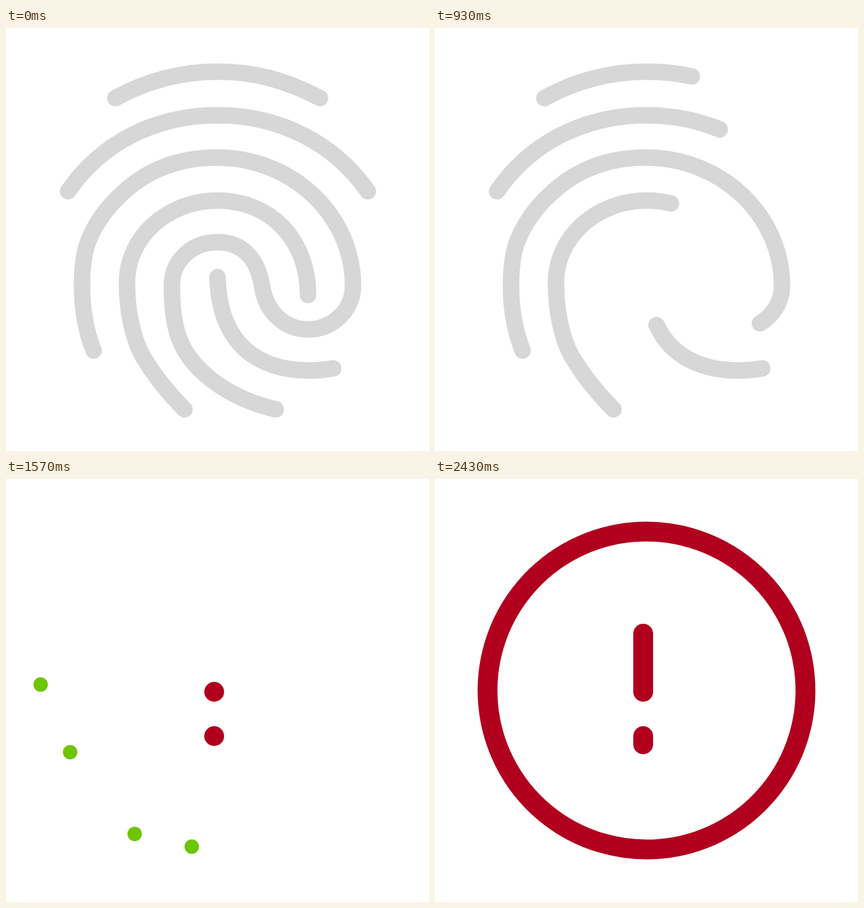
Animation of 640x640 px, one loop 4780 ms. Source, as an HTML page with a canvas:

```html
<!DOCTYPE html>
<html lang="en">
<head>
<meta charset="utf-8">
<title>Fingerprint rejected</title>
<style>
html, body { margin: 0; width: 100%; height: 100%; overflow: hidden; background: #fff; }
canvas { display: block; width: 640px; height: 640px; }
</style>
</head>
<body>
<canvas id="stage" width="640" height="640"></canvas>
<script>
const ctx = document.getElementById('stage').getContext('2d');
const LOOP = 4780, RATE = 14 / 1000;
const GREY = '#d7d7d7', GREEN = '#6dc504', RED = '#b0001e';

const clamp = v => Math.min(1, Math.max(0, v));
const span = (t, from, to) => clamp((t - from) / (to - from));
const smooth = u => u * u * (3 - 2 * u);

// Timing curve with control points (x1, 0) and (x2, 1)
function ease(u, x1, x2) {
  if (u <= 0 || u >= 1) return clamp(u);
  let lo = 0, hi = 1;
  for (let i = 0; i < 30; i++) {
    const s = (lo + hi) / 2, r = 1 - s;
    if (3 * x1 * s * r * r + 3 * x2 * s * s * r + s * s * s < u) lo = s;
    else hi = s;
  }
  return smooth(lo);
}

const fastOut = t => Math.pow(span(t, 0, 1269), 4);
const slowOut = t => ease(span(t, 100, 1400), 0.77, 0.675);

// Each ridge shrinks towards its first point
function ridge(d, erased) {
  const el = document.createElementNS('http://www.w3.org/2000/svg', 'path');
  el.setAttribute('d', d);
  return { path: new Path2D(d), size: el.getTotalLength(), erased };
}

const ridges = [
  ridge('M165.5 106C213 80 265 66 320.5 66C375 66 422 78.5 475 106', fastOut),
  ridge('M94 247C118.5 211 150.5 183 188.5 163C268.5 121.8 371 121.5 451.5 163' +
        'C489.5 182.5 522 211 547.5 247', fastOut),
  ridge('M132.5 488C120 456 115 425 115 390C115 365 117 340 126 319' +
        'C137 293 153 271 175 251C214 214 262 196 319 196C434 196 525 284 525 390' +
        'C525 427 494 456 457 456C420 456 394 428 388 394C382 352 360 324 320 324' +
        'C281 324 251 352 251 390C251 415 253 438 258 457C272 513 332 559 408 577', slowOut),
  ridge('M270 577C240 547 222 522 207 497C191 468 183 426 183 385' +
        'C183 317 244 261 320 261C400 261 457 320 457 404', fastOut),
  ridge('M495 515C470 519.5 435 520 407 511C352 494 322 449 320 377', fastOut)
];

// Flight curves of the dots: four control points each
const flights = [
  [165, 106, -69, 232, 98, 594, 318, 559],
  [94, 247, 23.5, 396, 181, 574.5, 321, 558.5],
  [132.5, 488, 178, 543, 258, 570, 321, 559],
  [270, 577, 281, 539.5, 284, 563.5, 321, 561]
];

function pen(color, width) {
  ctx.strokeStyle = color;
  ctx.lineWidth = width;
  ctx.lineCap = 'round';
  ctx.lineJoin = 'round';
}

function drawRidges(t) {
  pen(GREY, 25);
  for (const r of ridges) {
    const left = r.size * (1 - r.erased(t));
    if (left <= 0.01) continue;
    ctx.setLineDash(left >= r.size - 0.01 ? [] : [left, r.size * 2]);
    ctx.stroke(r.path);
  }
  ctx.setLineDash([]);
}

function drawDots(t) {
  if (t < 1269) return;
  const s = smooth(span(t, 1200, 2100)), r = 1 - s;
  const mix = (a, b, c, d) => a * r * r * r + 3 * b * r * r * s + 3 * c * r * s * s + d * s * s * s;
  ctx.fillStyle = GREEN;
  for (const f of flights) {
    ctx.beginPath();
    ctx.arc(mix(f[0], f[2], f[4], f[6]), mix(f[1], f[3], f[5], f[7]), 10.9, 0, Math.PI * 2);
    ctx.fill();
  }
}

function drawRing(t) {
  const p = ease(span(t, 1600, 2428), 0.313, 0.272);
  if (p <= 0) return;
  const start = Math.atan2(240, 21);
  pen(RED, 30);
  ctx.beginPath();
  ctx.arc(320, 320, 240.5, start, start - p * Math.PI * 2, true);
  ctx.stroke();
}

function bar(from, to) {
  ctx.beginPath();
  ctx.moveTo(315, from);
  ctx.lineTo(315, to + 0.01);
  ctx.stroke();
}

function drawMark(t) {
  if (t < 1567) return;
  const grow = ease(span(t, 1567, 2133), 0.77, 0.67);
  const lift = 36.5 * (smooth(span(t, 1567, 2000)) - smooth(span(t, 2000, 2370)));
  pen(RED, 30);
  bar(322 - lift - 88 * grow, 322 - lift);
  bar(389 - lift, 389 - lift + 12.5 * grow);
}

function draw(now) {
  // The picture advances in steps, fourteen per second
  const ms = Math.floor((now % LOOP) / 10) * 10 + 5;
  const t = Math.floor(ms * RATE) / RATE;
  ctx.fillStyle = '#fff';
  ctx.fillRect(0, 0, 640, 640);
  drawRidges(t);
  drawDots(t);
  drawRing(t);
  drawMark(t);
}

const begin = performance.now();
function tick() {
  draw(performance.now() - begin);
  requestAnimationFrame(tick);
}
tick();
</script>
</body>
</html>
```
